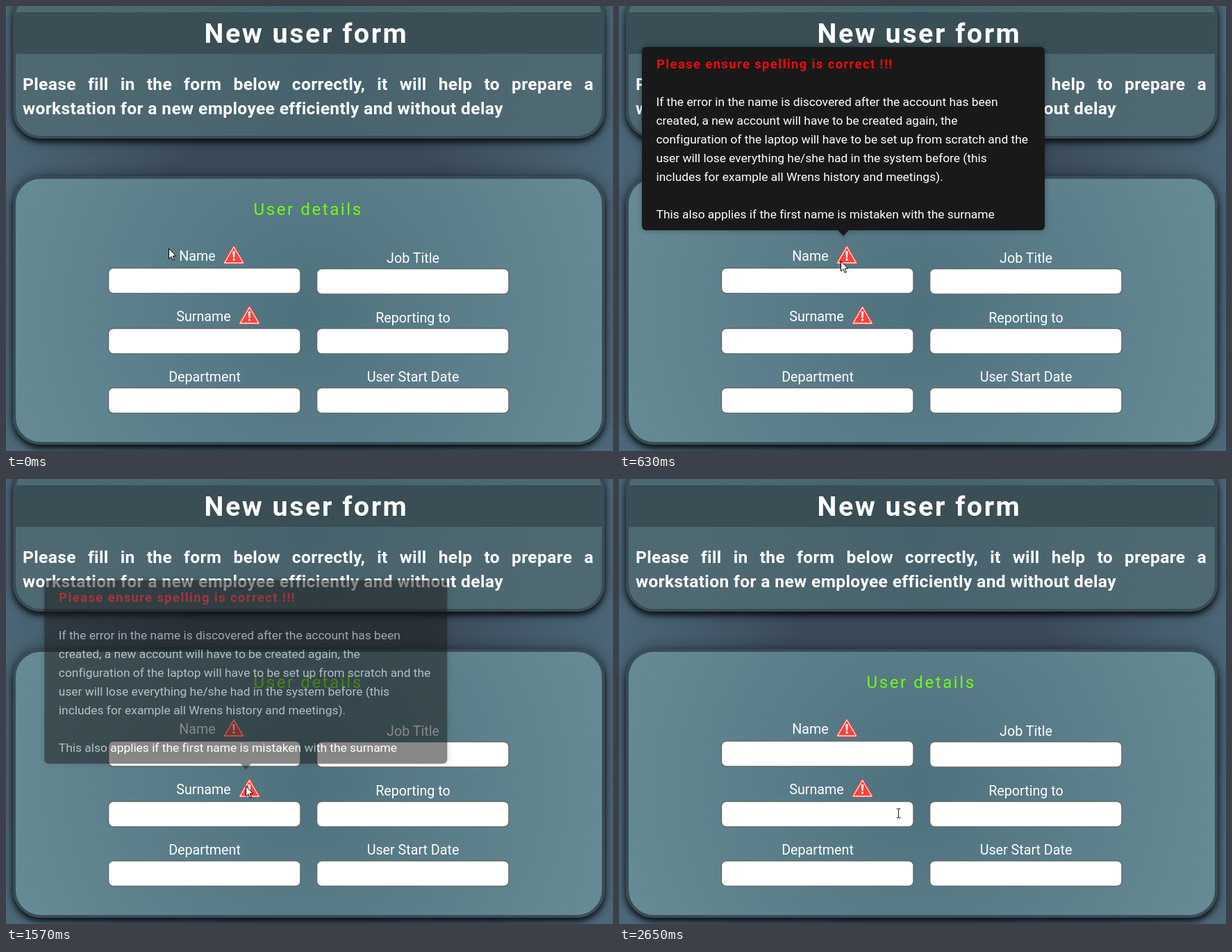
Recreate the animation shown at these times as an HTML page. Size 874x641 px, loop 2880 ms.

```html
<!DOCTYPE html>
<html lang="en">
<head>
<meta charset="utf-8">
<title>New user form</title>
<style>
html, body { margin: 0; width: 100%; height: 100%; overflow: hidden; }
body {
  position: relative;
  background: radial-gradient(ellipse 470px 560px at 436px 300px, #3b4a5b 40%, #4d6979 100%);
  font-family: Roboto, "Open Sans", sans-serif;
  font-variant-ligatures: none;
}
.card {
  position: absolute; left: 10px; width: 852px; box-sizing: border-box;
  border: 4px solid #394d56; border-radius: 40px; overflow: hidden;
  box-shadow: 0 5px 9px #000c, 0 0 20px #0006;
}
#intro { top: -24px; height: 215px; background: radial-gradient(circle at 50% 50%, #46626c, #4f6972 75%); }
#intro i { position: absolute; left: 0; right: 0; top: 29px; height: 60px; background: #394e55; }
#details { top: 245px; height: 387px; background: radial-gradient(circle at 416px 190px, #4e717e, #668a94 430px); }
.line {
  position: absolute; left: 24px; width: 822px; line-height: 35px; white-space: nowrap;
  font-size: 24.6px; font-weight: 700; letter-spacing: .35px; color: #fff;
}
.full { white-space: normal; text-align-last: justify; }
svg { position: absolute; left: 0; top: 0; fill: #fff; }
.title { font-size: 39.5px; font-weight: 600; letter-spacing: 2.5px; }
.section { font-size: 24px; letter-spacing: 2.6px; fill: #72fb12; }
#fields text { font-size: 19.7px; text-anchor: middle; }
#fields rect { stroke: #62676a; stroke-width: 1.5; }
#tip { font-size: 17.4px; }
#tip .box { fill: #191919; filter: drop-shadow(0 0 4px #0005); }
#tip .warn { font-size: 18.4px; font-weight: 700; letter-spacing: 1.4px; fill: #f00a0a; }
</style>
</head>
<body>
<div class="card" id="intro"><i></i></div>
<div class="card" id="details"></div>
<div class="line full" style="top:95px">Please fill in the form below correctly, it will help to prepare a</div>
<div class="line" style="top:130px">workstation for a new employee efficiently and without delay</div>

<svg width="874" height="641" viewBox="0 0 874 641">
  <defs>
    <g id="alert" stroke-linejoin="round">
      <path d="M0-11 13.500 12H-13.500Z" fill="#fa4340" stroke="#f0403c" stroke-width="3.6"/>
      <path d="M0-11 13.500 12H-13.500Z" fill="#fa4340" stroke="#ffe3e0" stroke-width="1.4"/>
      <path d="M-1.7-5H1.7L1 4.5H-1Z"/>
      <circle cy="7.2" r="1.6"/>
    </g>
  </defs>
  <text class="title" x="285.500" y="53">New user form</text>
  <text class="section" x="356.500" y="301">User details</text>
  <g id="fields"></g>
  <use href="#alert" x="328" y="358"/>
  <use href="#alert" x="350.500" y="445"/>
  <g id="tip">
    <g class="box">
      <rect x="33" y="59" width="580" height="264" rx="6"/>
      <path d="M314.500 322H331.500L323 331.500Z"/>
    </g>
    <text class="warn" x="54" y="90">Please ensure spelling is correct !!!</text>
  </g>
  <path id="arrow" d="M0 0V14.500L3.400 11.400 5.700 16.600 7.800 15.700 5.600 10.600H10.200Z" stroke="#000"/>
  <path id="beam" d="M-3-6.500H-1L0-5.500 1-6.500H3M-3 6.500H-1L0 5.500 1 6.500H3M0-5.500V5.500" fill="none" stroke="#222" stroke-width="1.1"/>
</svg>

<script>
const LOOP = 2880, FADE = 400;
const $ = id => document.getElementById(id);

function add(parent, tag, attrs, text = "") {
  const el = document.createElementNS("http://www.w3.org/2000/svg", tag);
  for (const key in attrs) el.setAttribute(key, attrs[key]);
  el.textContent = text;
  parent.append(el);
}

// label, label centre, label baseline, input left, input top
const fields = [
  ["Name", 275.5, 367, 147.5, 377.5],
  ["Surname", 284.5, 454, 147.5, 464.5],
  ["Department", 286, 541, 147.5, 550],
  ["Job Title", 586, 369.5, 447.5, 378.5],
  ["Reporting to", 586, 456, 447.5, 464.5],
  ["User Start Date", 586, 541, 447.5, 550]
];
for (const [label, cx, base, x, y] of fields) {
  add($("fields"), "text", { x: cx, y: base }, label);
  add($("fields"), "rect", { x, y, width: 276.5, height: 36.5, rx: 7 });
}

[
  "If the error in the name is discovered after the account has been",
  "created, a new account will have to be created again, the",
  "configuration of the laptop will have to be set up from scratch and the",
  "user will lose everything he/she had in the system before (this",
  "includes for example all Wrens history and meetings).",
  "",
  "This also applies if the first name is mistaken with the surname"
].forEach((line, i) => add($("tip"), "text", { x: 53.5, y: 144 + 27 * i }, line));

// pointer moves: start, end, target x, target y, ease-out power
const home = [234, 349];
const moves = [
  [0, 540, 319, 367, 3],
  [860, 1050, 326, 385, 1],
  [1050, 1540, 345, 442, 1],
  [2180, 2650, 402, 481, 1.4]
];
// tooltip visits: start, end, shift x, shift y
const hovers = [[240, 920, 0, 0], [1450, 2305, 22.3, 87]];

function pointer(t) {
  let [x, y] = home;
  for (const [from, to, tx, ty, power] of moves) {
    const u = Math.min(1, Math.max(0, (t - from) / (to - from)));
    const k = 1 - (1 - u) ** power;
    x += (tx - x) * k;
    y += (ty - y) * k;
  }
  return [x, y];
}

// the CSS "ease" curve, solved by bisection
function ease(x) {
  if (x >= 1) return 1;
  const bez = (s, a, b) => 3 * s * (1 - s) ** 2 * a + 3 * s * s * (1 - s) * b + s ** 3;
  let lo = 0, hi = 1;
  for (let i = 0; i < 20; i++) {
    const mid = (lo + hi) / 2;
    if (bez(mid, .25, .25) < x) lo = mid; else hi = mid;
  }
  return bez(lo, .1, 1);
}

function draw(now) {
  const t = now % LOOP;
  const [x, y] = pointer(t);
  const inInput = fields.some(f => x > f[3] && x < f[3] + 277 && y > f[4] && y < f[4] + 37);
  for (const id of ["arrow", "beam"]) {
    $(id).setAttribute("transform", `translate(${Math.round(x) + .5} ${Math.round(y) + .5})`);
    $(id).style.display = (id === "beam") === inInput ? "" : "none";
  }
  const hover = hovers.find(h => t >= h[0] && t < h[1]);
  $("tip").style.opacity = hover ? ease((t - hover[0]) / FADE) : 0;
  if (hover) $("tip").setAttribute("transform", `translate(${hover[2]} ${hover[3]})`);
}

const start = performance.now();
function tick() {
  draw(performance.now() - start);
  requestAnimationFrame(tick);
}
tick();
</script>
</body>
</html>
```
